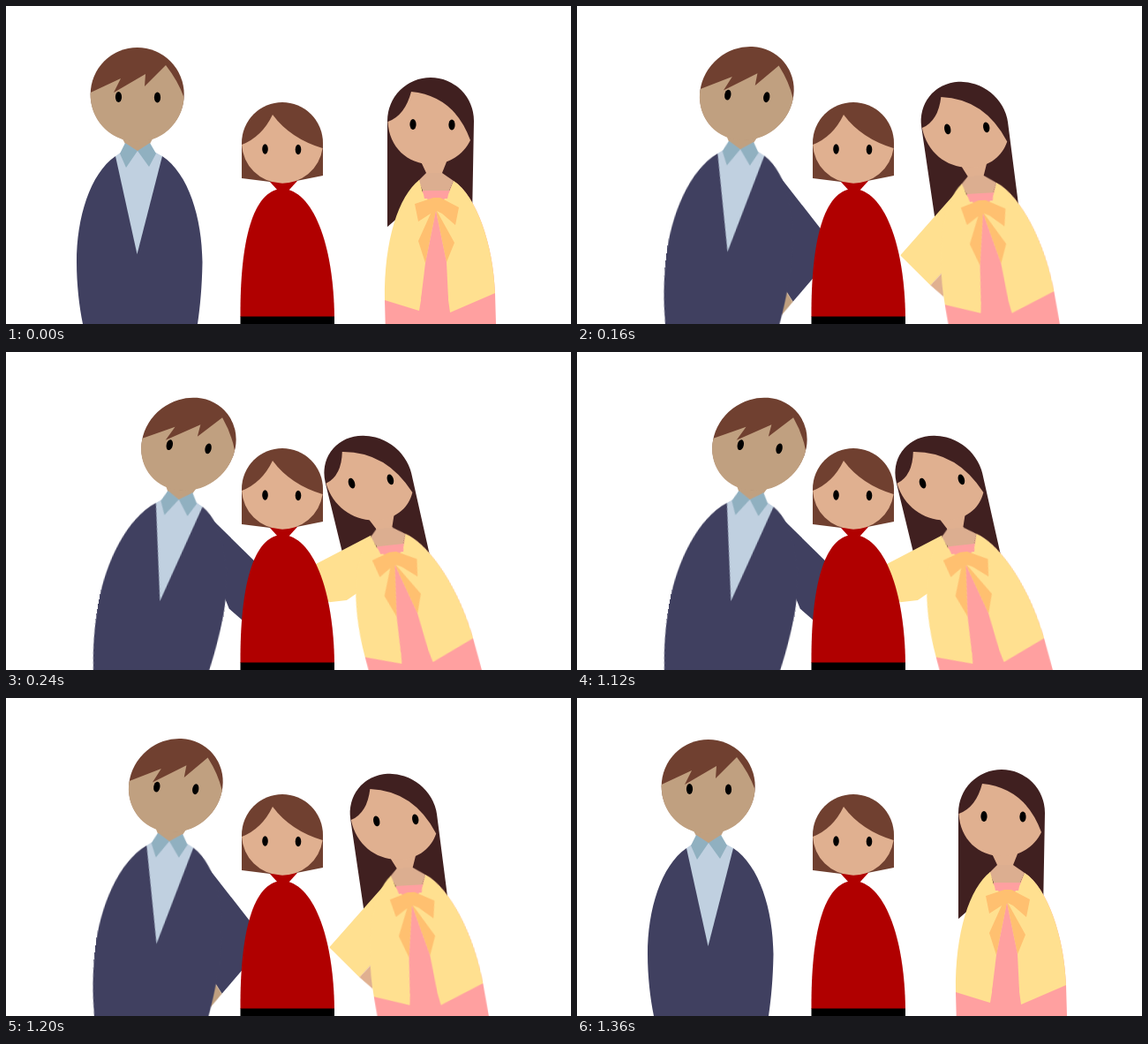
Recreate the animation shown at these times as an HTML page. Size 640x360 px, loop 1.92 s.

```html
<!DOCTYPE html>
<html lang="en">
<head>
<meta charset="utf-8">
<title>Family hug</title>
<style>
@property --k { syntax: "<number>"; inherits: true; initial-value: 0; }

html, body { margin: 0; width: 100%; height: 100%; overflow: hidden; background: #fff; }
svg { display: block; width: 100vw; height: 100vh; }

/* --k counts the steps from upright (0) to hug (4) and back. */
svg { animation: hug 1920ms steps(4) infinite; }
@keyframes hug {
  0%, 70.833%, 100% { --k: 0; }
  16.666%, 54.166% { --k: 4; }
}

/* The upright axis turns by --lean, the level axis by a smaller --tilt. */
.adult {
  --lean: calc(var(--side) * var(--k) * (.06 + var(--bend) * var(--k)) * 1rad);
  --tilt: calc(var(--lean) * (.28 + .06 * var(--k)));
  transform: matrix(cos(var(--tilt)), sin(var(--tilt)), calc(-1 * sin(var(--lean))), cos(var(--lean)), 0, 0);
  animation: 1920ms step-end infinite;
}
#dad { --side: 1; --bend: 0; transform-origin: 149px 164px; animation-name: dad-walk; }
#mom { --side: -1; --bend: .0065; transform-origin: 487px 198px; animation-name: mom-walk; }

@keyframes dad-walk {
  0%, 70.833%, 100% { translate: 0px 0px; }
  4.166%, 66.666% { translate: 18px -1px; }
  8.333%, 62.5% { translate: 36px -1.8px; }
  12.5%, 58.333% { translate: 46.8px 3px; }
  16.666% { translate: 64.5px 9px; }
}
@keyframes mom-walk {
  0%, 70.833%, 100% { translate: 0px 0px; }
  4.166%, 66.666% { translate: -16px 1.6px; }
  8.333%, 62.5% { translate: -32px 3.2px; }
  12.5%, 58.333% { translate: -54.5px 10px; }
  16.666% { translate: -61.2px 10.5px; }
}

/* Arms: tucked, bent, reaching, with one step between each. */
.arm { animation: 1920ms steps(2) infinite; }
#dad .arm { animation-name: dad-arm; }
#mom .arm { animation-name: mom-arm; }
@keyframes dad-arm {
  0%, 70.833%, 100% { d: path("M190 185L200 260L190 330L185 316L195 262Z"); }
  8.333%, 62.5% { d: path("M190 185L272 273L229 334L215 316L205 262Z"); }
  16.666%, 54.166% { d: path("M178 172L290 234L262 257L240 250L219.5 253Z"); }
}
@keyframes mom-arm {
  0%, 70.833%, 100% { d: path("M469 198L455 262L450 310L455 294L450 262Z"); }
  8.333%, 62.5% { d: path("M469 198L387 274L416 310L434 294L445 262Z"); }
  16.666%, 54.166% { d: path("M468 193L356 189L392 222L414 238L437 253Z"); }
}

.resting { animation: resting 1920ms step-end infinite; }
.hugging { animation: hugging 1920ms step-end infinite; }
@keyframes resting {
  0%, 12.5%, 66.666%, 100% { opacity: 0; }
  8.333%, 62.5% { opacity: 1; }
}
@keyframes hugging {
  0%, 58.333%, 100% { opacity: 0; }
  16.666% { opacity: 1; }
}

.tan { fill: #c0a080; }
.skin { fill: #e0b090; }
.brown { fill: #704030; }
.dark { fill: #402020; }
.navy { fill: #404060; }
.yellow { fill: #ffe090; }
.pink { fill: #ffa0a0; }
.bow { fill: #ffc070; }
.red { fill: #b00000; }
</style>
</head>
<body>
<svg viewBox="0 0 640 360">
  <defs><ellipse id="eye" rx="3.6" ry="6"/></defs>

  <g id="dad" class="adult">
    <path class="arm navy"/>
    <path class="resting tan" d="M215 316L229 334L218 350Z"/>
    <path class="tan" d="M128 143L135 156L149 168L163 156L170 143Z"/>
    <circle class="brown" cx="148.7" cy="100" r="53"/>
    <path class="tan" d="M95.7 98L130 82L122 98L158 77L157 91L181 67Q195 85 201.6 103.5A53 53 0 0 1 95.7 98Z"/>
    <use href="#eye" x="127.5" y="103"/>
    <use href="#eye" x="171.5" y="103.5"/>
    <path class="navy" d="M124 170C95 190 80 240 80 290C80 315 83 340 87 360L95 410H208L217 360C220 340 222 318 222.5 290C222 240 207 190 177 170Z"/>
    <path fill="#c0d0e0" d="M124 170L131 165L149 164L168 165L177 170L148.5 281Z"/>
    <path fill="#90b0c0" d="M135 155L149 164L136 183L129 167ZM163 155L149 164L162 182L170 167Z"/>
  </g>

  <g id="mom" class="adult">
    <path class="dark" d="M432 250V130A49 49 0 0 1 530 130L528 240L490 200Z"/>
    <path class="skin" d="M469 174L476 189V195H494V189L500 174Z"/>
    <path class="skin" d="M459 97Q452 124 432.5 131C434 160 455 179 481 179C503 179 518 168 526 152Q508 102 459 97Z"/>
    <use href="#eye" x="461" y="134"/>
    <use href="#eye" x="505" y="134.5"/>
    <path class="arm yellow"/>
    <path class="resting skin" d="M434 294L416 310L429 324Z"/>
    <path class="pink" d="M472 209H502L507 198C533 215 552 270 554 325L555 360L558 410H431L429 333L468 230Z"/>
    <path fill="#dcae90" d="M467 198L476 189H494L507 198L502 209H472Z"/>
    <path class="yellow" d="M468 197C445 215 428 265 429 333L468 345L487 232L472 211ZM507 198C533 215 552 270 554 325L503 347L487 232L502 211Z"/>
    <path class="pink" d="M472 209H502L500 218H474Z"/>
    <path class="bow" d="M463 224L484 217H492L513 228L509 248L494 235L488 232L508 268L499 290L487 232L475 291L467 266L481 235L467 244Z"/>
    <path class="pink" d="M487 232L475 291L470 332H501L499 290Z"/>
  </g>

  <g class="hugging">
    <path class="tan" d="M357 248L374 262L364 272L350 262Z"/>
    <path class="skin" d="M270 235L287 220L300 235L279 241Z"/>
  </g>

  <g id="child">
    <path class="red" d="M313 207C279 208 265 268 265.5 352H372C371 268 347 208 313 207Z"/>
    <path class="red" d="M298 198L308 209H320L330 198Z"/>
    <path d="M265.5 351.5H372V360H265.5Z"/>
    <path class="brown" d="M267 195V155A46 46 0 0 1 359 155V192L329 198L299 199Z"/>
    <path class="skin" d="M302 123Q290 148 267.1 157A46 46 0 0 0 358.6 161Q322 150 302 123Z"/>
    <ellipse cx="293.5" cy="162" rx="3.3" ry="5.8"/>
    <ellipse cx="331" cy="162.5" rx="3.3" ry="5.8"/>
  </g>
</svg>
</body>
</html>
```
